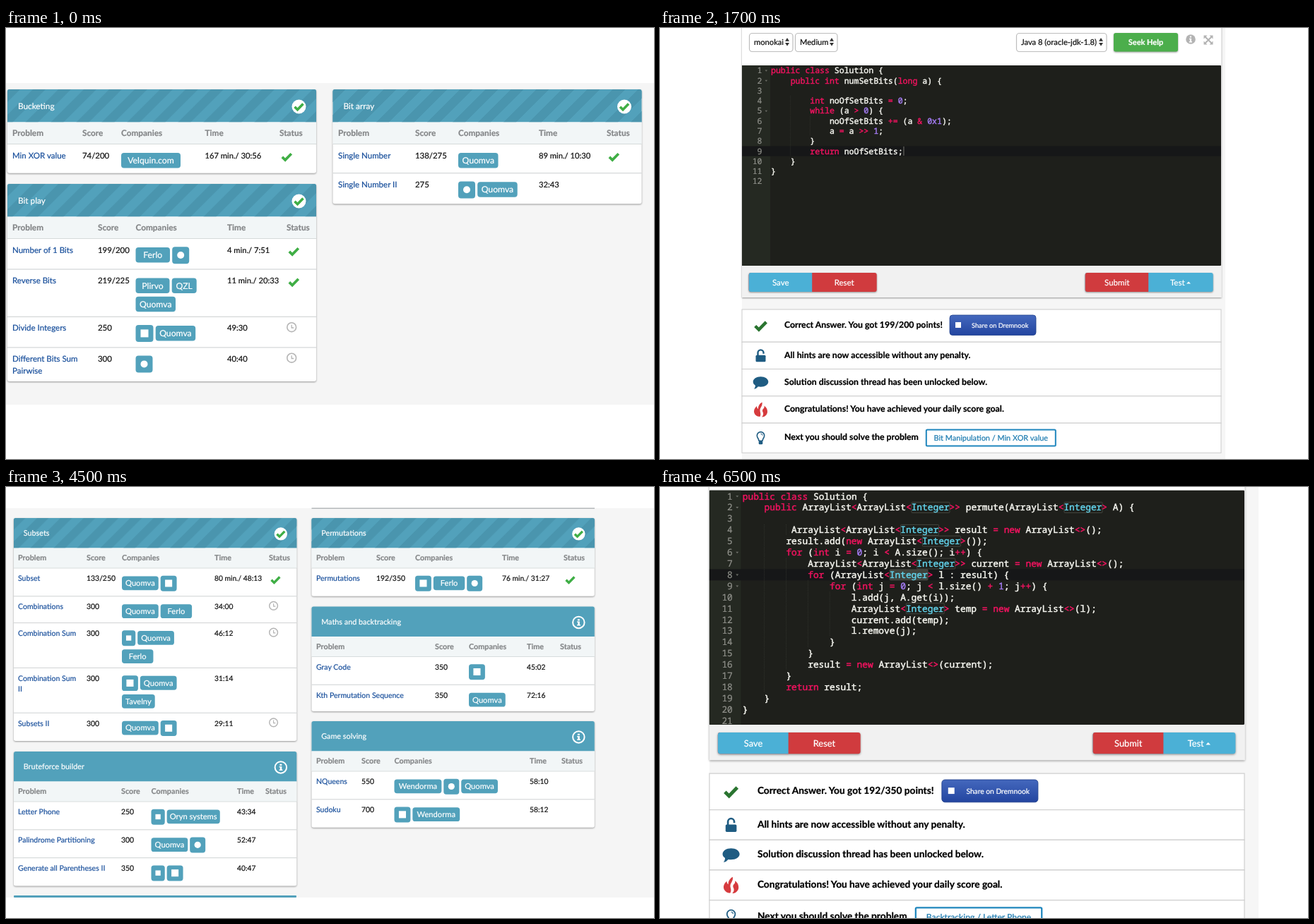
Animation, 917 px wide and 611 px high, one loop 8000 ms. Source, as an HTML page:

```html
<!DOCTYPE html>
<html lang="en">
<head>
<meta charset="utf-8">
<title>Bit manipulation practice</title>
<style>
  html, body { margin: 0; width: 100%; height: 100%; overflow: hidden; background: #fff; }
  svg { display: block; width: 100vw; height: 100vh; }
  text { font-family: Lato, "Open Sans", sans-serif; white-space: pre; text-rendering: geometricPrecision; }
  text, tspan { fill: currentColor; stroke: currentColor; stroke-width: .22px; }
  .code text { font: 500 11.53px "Noto Sans Mono", "DejaVu Sans Mono", monospace; }
  .code .line, .code tspan { stroke-width: .42px; }
  .shade { filter: drop-shadow(0 1px 1.2px rgba(0, 0, 0, .4)); }
</style>
</head>
<body>
<svg id="stage" viewBox="0 0 917 611"></svg>
<script>
const esc = s => s.replace(/&/g, '&amp;').replace(/</g, '&lt;').replace(/>/g, '&gt;');
const text = (x, y, s, size = 11.4, color = '#111', more = '') =>
  `<text x="${x}" y="${y}" font-size="${size}" color="${color}" ${more}>${esc(s)}</text>`;
const rect = (x, y, w, h, fill, r = 0, more = '') =>
  `<rect x="${x}" y="${y}" width="${w}" height="${h}" fill="${fill}" rx="${r}" ${more}/>`;
const path = (d, fill = 'none', more = '') => `<path d="${d}" fill="${fill}" ${more}/>`;
const circle = (x, y, r, fill, more = '') => `<circle cx="${x}" cy="${y}" r="${r}" fill="${fill}" ${more}/>`;
const at = (x, y, body, scale = 1) => `<g transform="translate(${x} ${y}) scale(${scale})">${body}</g>`;
const pen = (color, width) => `stroke="${color}" stroke-width="${width}"`;
const BOLD = 'font-weight="700"', MID = 'text-anchor="middle"';

const check = (color, width = 3.4) => path('M-6 .3L-2 4.2L6-4', 'none', pen(color, width));

// ---- Topic tables ----

const TEAL = '#52a1bb', GREEN = '#3fae45';
const badgeWidth = {
  'Velquin.com': 84, Quomva: 56.5, Ferlo: 48.5, Plirvo: 48, QZL: 35, Wendorma: 73,
  Tavelny: 51, 'Oryn systems': 82, square: 25, circle: 24, narrow: 21
};

function badge(name, x, y) {
  const w = badgeWidth[name], mid = x + w / 2;
  if (name === 'circle') return rect(x, y - .8, w, 24, TEAL, 4) + circle(mid, y + 11, 5, '#fff');
  if (name === 'square' || name === 'narrow') {
    const side = name === 'square' ? 11 : 8;
    return rect(x, y - .8, w, 24, TEAL, 4) + rect(mid - side / 2, y + 11 - side / 2, side, side, '#fff');
  }
  return rect(x, y, w, 21.6, TEAL, 4) + text(mid, y + 15, name, 12.2, '#fff', MID);
}

const clock = circle(0, 0, 6.4, 'none', pen('#b5b5b5', 1.6)) + path('M0-3.5V.8H3', 'none', pen('#b5b5b5', 1.3));
const info = circle(0, 0, 9, 'none', pen('#fff', 2.2)) +
  path('M-1.6-5.2h3.2v2.4h-3.2zM-2.4-1.6h4v5h1.2v1.6h-5.2v-1.6h1.2v-3.4h-1.2z', '#fff');

function card(x, y, scale, title, done, columns, rows) {
  const W = 437, cols = columns.map(c => (c - x) / scale);
  let top = 77.5, body = '';
  for (const [name, score, tags, time, status] of rows) {
    if (top > 78) body += rect(0, top - .6, W, 1.2, '#d3d6d7');
    const names = name.split('\n');
    names.forEach((s, i) => body += text(cols[0], top + 20 + 17.2 * i, s, 11.5, '#1a509c'));
    body += text(cols[1], top + 20, score) + text(cols[3], top + 20, time, 11.2);
    let line = 0;
    for (const group of tags.split('|')) {
      let left = cols[2], step = 26.2;
      for (const tag of group.split(',')) {
        body += badge(tag, left, top + 12.5 + line);
        left += badgeWidth[tag] + 3.2;
        if (badgeWidth[tag] < 26) step = 28.5;
      }
      line += step;
    }
    if (status === 1) body += at(cols[4] + 10.3, top + 18, check(GREEN), 1.08);
    if (status === 2) body += at(cols[4] + 7.2, top + 14.8, clock);
    top += Math.max(15 + line, 14 + 17 * names.length);
  }
  const head = 'M0 46.5V3Q0 0 3 0H434Q437 0 437 3V46.5z';
  const labels = ['Problem', 'Score', 'Companies', 'Time', 'Status']
    .map((s, i) => text(cols[i], 66, s, 11.8, '#858789', BOLD)).join('');
  return at(x, y,
    rect(0, 0, W, top, '#fff', 3, 'class="shade"') +
    path(head, TEAL) + (done ? path(head, 'url(#stripes)') : '') +
    text(15, 27.5, title, 11.8, '#fff') +
    at(412.5, 24.5, done ? circle(0, 0, 10, '#fff') + check(GREEN, 3.6) : info) +
    rect(0, 46.5, W, 31, '#f2f6f7') + rect(0, 77, W, 1, '#d5dada') + labels + body, scale);
}

const bitTopics = rect(0, 78, 917, 456, '#f5f5f5') +
  card(2, 87, 1, 'Bucketing', true, [9, 108, 163, 281.5, 387], [
    ['Min XOR value', '74/200', 'Velquin.com', '167 min./ 30:56', 1]]) +
  card(2, 221, 1, 'Bit play', true, [9, 130, 183.5, 313, 397], [
    ['Number of 1 Bits', '199/200', 'Ferlo,circle', '4 min./ 7:51', 1],
    ['Reverse Bits', '219/225', 'Plirvo,QZL|Quomva', '11 min./ 20:33', 1],
    ['Divide Integers', '250', 'square,Quomva', '49:30', 2],
    ['Different Bits Sum\nPairwise', '300', 'circle', '40:40', 2]]) +
  card(462.5, 87, 1, 'Bit array', true, [470, 579, 640, 754, 850], [
    ['Single Number', '138/275', 'Quomva', '89 min./ 10:30', 1],
    ['Single Number II', '275', 'circle,Quomva', '32:43', 0]]);

const S = .916;
const backtracking = rect(0, 30, 917, 552, '#f5f5f5') +
  rect(432.5, 29.5, 400.5, 1.5, '#b4b8ba') +
  card(11, 44, S, 'Subsets', true, [17, 114, 164, 295, 372], [
    ['Subset', '133/250', 'Quomva,square', '80 min./ 48:13', 1],
    ['Combinations', '300', 'Quomva,Ferlo', '34:00', 2],
    ['Combination Sum', '300', 'narrow,Quomva|Ferlo', '46:12', 2],
    ['Combination Sum\nII', '300', 'square,Quomva|Tavelny', '31:14', 0],
    ['Subsets II', '300', 'Quomva,square', '29:11', 2]]) +
  card(11, 375, S, 'Bruteforce builder', false, [17, 163, 205.5, 327, 367], [
    ['Letter Phone', '250', 'narrow,Oryn systems', '43:34', 0],
    ['Palindrome Partitioning', '300', 'Quomva,circle', '52:47', 0],
    ['Generate all Parentheses II', '350', 'narrow,square', '40:47', 0]]) +
  card(432.5, 44, S, 'Permutations', true, [439, 524, 579, 702, 789], [
    ['Permutations', '192/350', 'square,Ferlo,circle', '76 min./ 31:27', 1]]) +
  card(432.5, 169.5, S, 'Maths and backtracking', false, [439, 607, 655, 737, 784], [
    ['Gray Code', '350', 'square', '45:02', 0],
    ['Kth Permutation Sequence', '350', 'Quomva', '72:16', 0]]) +
  card(432.5, 332, S, 'Game solving', false, [439, 503, 549.5, 741, 786], [
    ['NQueens', '550', 'Wendorma,circle,Quomva', '58:10', 0],
    ['Sudoku', '700', 'square,Wendorma', '58:12', 0]]) +
  rect(11, 579, 400, 3, TEAL, 1);

// ---- Code editor and results ----

const CHAR = 6.92, LINE = 14.27, RIGHT = 794;
const BLUE = '#1f5c82', RED = '#d63b3e', CYAN = '#4bb0d6';
const inks = ['#f0135f', '#62d2ea', '#a57cf5', '#f0135f'];
const syntax = /\b(public|class|int|long|while|return|new|for)\b|\b(Integer|Math)\b|\b(0x1|\d+)\b|([=<>+&-]+)/g;

function colored(line) {
  let out = '', last = 0;
  for (const m of line.matchAll(syntax)) {
    const ink = inks[m.slice(1).findIndex(Boolean)];
    out += esc(line.slice(last, m.index)) + `<tspan color="${ink}">${esc(m[0])}</tspan>`;
    last = m.index + m[0].length;
  }
  return out + esc(line.slice(last));
}

function codeBox(o) {
  const { left, top, active } = o;
  let out = rect(left, top, RIGHT - left, 337 - top, '#1e1f1b', 1) + rect(left, top, 40, 337 - top, '#252922');
  const activeY = top + 7.4 + (active - 1) * LINE - LINE / 2;
  out += rect(left, activeY, RIGHT - left, LINE, '#161718');
  o.code.split('\n').forEach((line, i) => {
    const mid = top + 7.4 + i * LINE, indent = line.search(/\S/);
    for (let c = 4; c < indent; c += 4)
      out += path(`M${157 + c * CHAR} ${mid - 7}v14`, 'none', pen('#383a34', .7) + ' stroke-dasharray="1 1"');
    if (o.boxes) for (const m of line.matchAll(/Integer/g))
      out += rect(157 + m.index * CHAR, mid - 6.6, 7 * CHAR, 13.4, i + 1 === active ? '#3f423b' : 'none', 1, pen('#4f5049', .7));
    out += `<text x="144.5" y="${mid + 4}" color="#8f908a" text-anchor="end">${i + 1}</text>`;
    if (line.endsWith('{')) out += path(`M148.5 ${mid - .8}h3.6l-1.8 2.2z`, '#6c6e67');
    out += `<text class="line" x="157" y="${mid + 4}" color="#f8f8f2">${colored(line)}</text>`;
  });
  if (o.cursor !== undefined) out += rect(157.6 + o.cursor * CHAR, activeY + .5, 1, 13, '#77776f');
  return `<g class="code">${out}</g>`;
}

const select = (x, w, label) => rect(x, 7.5, w, 26, '#fff', 4, pen('#bdbdbd', 1.2)) +
  text(x + 6.5, 24, label, 11.2) + path(`M${x + w - 11} 18.7l3-4.6 3 4.6zm0 2.2l3 4.6 3-4.6z`, '#333');

const toolbar = select(126.5, 61.5, 'monokai') + select(191.5, 59.5, 'Medium') +
  select(504.5, 127.5, 'Java 8 (oracle-jdk-1.8)') +
  rect(642, 7, 91, 26.5, '#4cae4c', 3, 'class="shade"') + text(687.5, 24, 'Seek Help', 11, '#fff', MID + ' ' + BOLD) +
  circle(751, 16, 6.8, '#b3b3b3') + path('M749 14.8h3v4.2h1v1.4h-4.2v-1.4h1v-2.8h-.8zM749.8 11.6h2.2v2h-2.2z', '#fff') +
  path('M771 12l10 10M781 12l-10 10', 'none', pen('#b3b3b3', 2)) +
  path('M769.5 10.5h5l-5 5zM782.5 10.5v5l-5-5zM769.5 23.5v-5l5 5zM782.5 23.5h-5l5-5z', '#b3b3b3');

const pair = (x, first, second, a, b) =>
  `<g class="shade">${rect(x, 347, 181, 27, b, 3)}${path(`M${x + 3} 347h86.5v27H${x + 3}q-3 0-3-3v-21q0-3 3-3z`, a)}</g>` +
  text(x + 45, 364.5, first, 11.5, '#fff', MID) + text(x + 135, 364.5, second, 11.5, '#fff', MID);

const icons = {
  check: at(0, 0, check('#2a7430', 3.4), 1.3),
  lock: rect(-7, -.5, 14, 9.5, BLUE, 1.5) + path('M-4 0v-4a4 4 0 0 1 8 0v1.5', 'none', pen(BLUE, 2.4)),
  chat: path('M0-8.5C6-8.5 10.8-5.4 10.8-1.2S6 6 0 6Q-2 6-3.6 5.6Q-6 8.8-9.5 9.2Q-7.6 7-7.6 4Q-10.8 2-10.8-1.2C-10.8-5.4-6-8.5 0-8.5z', BLUE),
  fire: path('M2-10.5C3-5-1-3-1 1C-1 4 1 6-1 10C-6 10-9.5 6.5-9.5 2.5C-9.5-1-7-3.5-5.5-5C-5.5-2.5-4.5-1.5-3.5-1C-4-5-1-9 2-10.5z', RED) +
    path('M5-5.5C8.5-3 9.5 0 9.5 3C9.5 7 6 10.5 1.5 10.5C4 8 4 5.5 3 3.5C2 1.5 2.5-.5 4-1.5C5-2.5 5.3-4 5-5.5z', RED),
  cap: path('M-13-4.5L0-9L13-4.5L0 0z', RED) + path('M-7-.5L0 2L7-.5V5Q0 9.5-7 5z', RED) +
    path('M-10.5-3.5V4', 'none', pen(RED, 1.6)) + path('M-12 8l1.5-5 1.5 5z', RED),
  bulb: path('M-2.5 4C-2.5 1-5.2 0-5.2-3.4A5.2 5.2 0 0 1 5.2-3.4C5.2 0 2.5 1 2.5 4z', 'none', pen(BLUE, 1.6)) +
    rect(-2.8, 4.5, 5.6, 4.5, BLUE, 1.5) + path('M0-6Q2.5-6 2.5-3.5', 'none', pen(BLUE, 1))
};

function results(o) {
  const rows = [
    ['check', `Correct Answer. You got ${o.points} points!`],
    ['lock', 'All hints are now accessible without any penalty.'],
    ['chat', 'Solution discussion thread has been unlocked below.'],
    ...(o.topicDone ? [['cap', 'Topic Completed']] : []),
    ['fire', 'Congratulations! You have achieved your daily score goal.'],
    ['bulb', 'Next you should solve the problem']
  ];
  let y = 399, out = '';
  rows.forEach(([icon, label], i) => {
    const h = i === 0 ? 46.2 : icon === 'bulb' ? 42.2 : 38.3, mid = y + h / 2;
    out += rect(o.left, y, RIGHT - o.left, h, '#fff', 0, pen('#cfcfcf', 1.1)) +
      at(142.5, mid, icons[icon]) + text(176, mid + 3.2, label, 12.3, '#000', BOLD);
    if (i === 0) out += rect(o.share, 407, 122, 28.5, 'url(#share)', 4, pen('#203f8c', .8)) +
      rect(o.share + 8, 417, 8, 8, '#fff') + text(o.share + 31, 424.5, 'Share on Dremnook', 9.2, '#fff');
    if (icon === 'bulb') out += rect(376.8, y + 9.5, o.nextWidth, 23, '#fff', 1.5, pen('#1f86bd', 2)) +
      text(376.8 + o.nextWidth / 2, y + 25, o.next, 10.9, '#1c7bb0', MID);
    y += h;
  });
  return out;
}

function editor(x, y, scale, o) {
  const { left, top } = o;
  return at(x, y,
    rect(left, -10, o.edge - left, 700, '#f6f6f6') +
    `<g class="shade">${rect(left, -10, RIGHT + .5 - left, 392, '#fff')}</g>` +
    rect(left, 337, RIGHT + .5 - left, 45, '#f1f1f1') +
    at(0, top - 53, toolbar) + codeBox(o) +
    pair(125.7, 'Save', 'Reset', CYAN, '#d03b3e') +
    pair(601.7, 'Submit', 'Test   ', '#d03b3e', CYAN) + path('M745 362.5l3-3 3 3z', '#fff') +
    results(o), scale);
}

const countBits = editor(0, 0, 1, {
  left: 116, top: 53, edge: 800, active: 9, cursor: 27, points: '199/200', share: 410,
  next: 'Bit Manipulation / Min XOR value', nextWidth: 183,
  code: `public class Solution {
    public int numSetBits(long a) {

        int noOfSetBits = 0;
        while (a > 0) {
            noOfSetBits += (a & 0x1);
            a = a >> 1;
        }
        return noOfSetBits;
    }
}
`
});

const minXor = editor(24.3, .9, .9455, {
  left: 114, top: 53, edge: 806, active: 14, cursor: 0, points: '74/200', share: 403.3, topicDone: true,
  next: 'Time Complexity / LOOP_CMPL', nextWidth: 177,
  code: `public class Solution {
    public int findMinXor(ArrayList<Integer> A) {

         Collections.sort(A);
        int minXOR = Integer.MAX_VALUE;

        for (int i = 0; i < A.size() - 1; i++) {

            minXOR = Math.min(minXOR, A.get(i)^A.get(i+1));

        }

        return minXOR;

    }
}
`
});

const permute = editor(-58.3, -38.8, 1.115, {
  left: 115, top: 39.1, edge: 811.9, active: 8, boxes: true, points: '192/350', share: 410,
  next: 'Backtracking / Letter Phone', nextWidth: 160,
  code: `public class Solution {
    public ArrayList<ArrayList<Integer>> permute(ArrayList<Integer> A) {

         ArrayList<ArrayList<Integer>> result = new ArrayList<>();
        result.add(new ArrayList<Integer>());
        for (int i = 0; i < A.size(); i++) {
            ArrayList<ArrayList<Integer>> current = new ArrayList<>();
            for (ArrayList<Integer> l : result) {
                for (int j = 0; j < l.size() + 1; j++) {
                    l.add(j, A.get(i));
                    ArrayList<Integer> temp = new ArrayList<>(l);
                    current.add(temp);
                    l.remove(j);
                }
            }
            result = new ArrayList<>(current);
        }
        return result;
    }
}
`
});

// ---- Playback ----

const scenes = [bitTopics, countBits, minXor, backtracking, permute];
const starts = [0, 500, 2500, 4500, 6500];
const stage = document.getElementById('stage');
stage.innerHTML = `<defs>
  <pattern id="stripes" width="36" height="36" patternUnits="userSpaceOnUse" patternTransform="skewX(-45)">
    ${rect(0, 0, 18, 36, '#4a95ae')}</pattern>
  <linearGradient id="share" x2="0" y2="1"><stop stop-color="#4468bd"/><stop offset="1" stop-color="#2345a0"/></linearGradient>
</defs>` + scenes.map(s => `<g class="scene">${s}</g>`).join('');
const groups = stage.querySelectorAll('.scene');

function draw() {
  const t = performance.now() % 8000;
  const now = starts.filter(s => s <= t).length - 1;
  groups.forEach((g, i) => g.style.display = i === now ? '' : 'none');
  requestAnimationFrame(draw);
}
draw();
</script>
</body>
</html>
```
